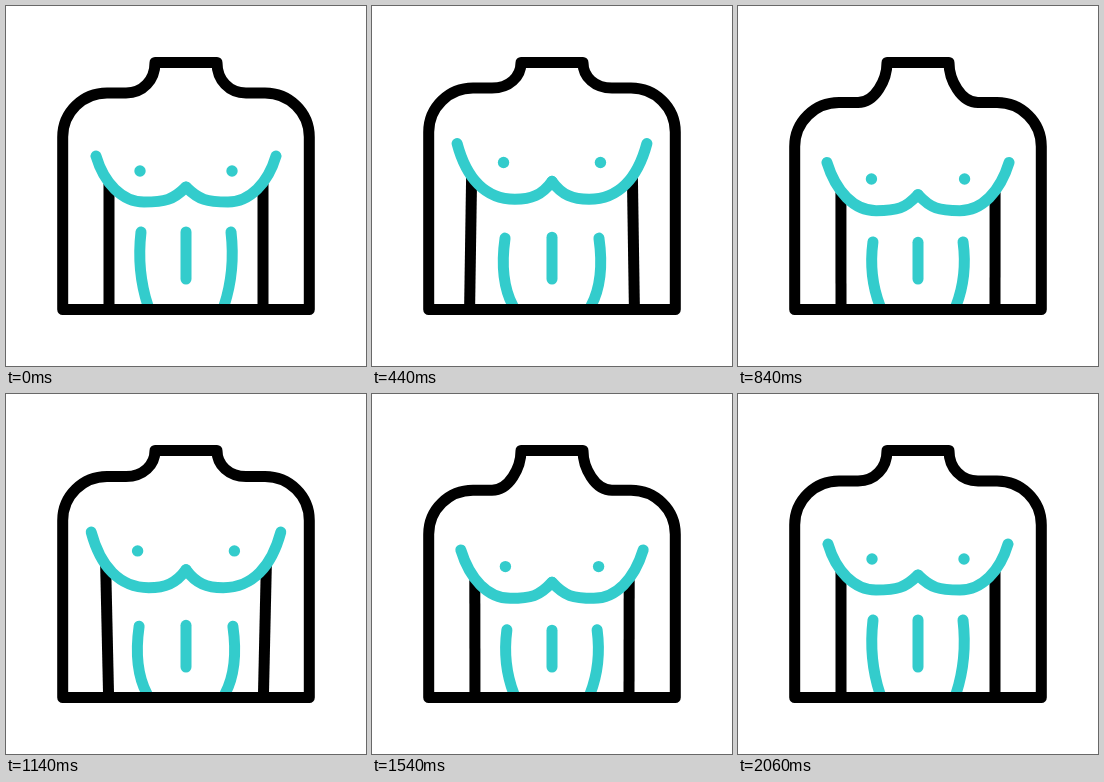
Animation, 360 px wide and 360 px high, one loop 2400 ms. Source, as an HTML page:

```html
<!DOCTYPE html>
<html lang="en">
<head>
<meta charset="utf-8">
<title>Breathing torso</title>
<style>
  html, body { margin: 0; width: 100%; height: 100%; overflow: hidden; background: #fff; }
  svg { display: block; width: 100vw; height: 100vh; }
  path { fill: none; stroke-width: 11; stroke-linejoin: round; }
  .ink { stroke: #000; }
  .teal { stroke: #3cc; stroke-linecap: round; }
  circle { fill: #3cc; }
</style>
</head>
<body>
<svg viewBox="0 0 360 360">
  <g id="half">
    <path id="arm" class="ink"/>
    <path id="chest" class="teal"/>
    <circle id="dot" r="5.7"/>
    <path id="side" class="teal"/>
    <path id="body" class="ink"/>
  </g>
  <use href="#half" transform="translate(360) scale(-1 1)"/>
  <path id="middle" class="teal"/>
</svg>
<script>
const LOOP = 2400;

// All shapes are the left half; the right half is mirrored.
const rest = {
  shoulder: [87, 74],
  arm: [103, 178, 103],
  chest: [90, 150, 98, 177, 116, 196, 138, 196, 159, 196, 167, 194, 180, 181],
  dot: [134, 165],
  side: [135, 226, 130.5, 265, 142, 300],
  middle: [226]
};
const inhale = {
  shoulder: [81.7, 71],
  arm: [99.5, 171, 97.5],
  chest: [85, 137, 94, 171, 113, 193, 143, 193, 159, 193, 170, 189, 180, 175],
  dot: [131.5, 156],
  side: [133, 232, 127, 274, 141, 300],
  middle: [231]
};
const exhale = {
  shoulder: [97, 74],
  arm: [103, 187, 103],
  chest: [89, 157, 98, 186, 116, 205, 138, 205, 159, 205, 167, 203, 180, 189],
  dot: [133.5, 173.5],
  side: [135, 236, 130.5, 270, 142, 300],
  middle: [236.5]
};
const secondInhale = { ...inhale, arm: [99.5, 171, 102.5] };

const steps = [
  [0, rest], [400, inhale], [800, exhale],
  [1200, secondInhale], [1600, exhale], [2060, rest], [LOOP, rest]
];

const el = id => document.getElementById(id);
const draw = (id, d) => el(id).setAttribute('d', d);
const ease = p => (1 - Math.cos(Math.PI * p)) / 2;

function poseAt(t) {
  const i = steps.findIndex(s => s[0] > t);
  const [t0, from] = steps[i - 1];
  const [t1, to] = steps[i];
  const p = ease((t - t0) / (t1 - t0));
  const pose = {};
  for (const key in from) {
    pose[key] = from[key].map((v, n) => v + (to[key][n] - v) * p);
  }
  return pose;
}

function render(t) {
  const pose = poseAt(t);
  const [y, neck] = pose.shoulder;
  const [topX, topY, footX] = pose.arm;
  const [x0, y0, ...curve] = pose.chest;
  const [sx, sy, ...bend] = pose.side;

  draw('body', `M181 56.5H149C149 ${neck} 137 ${y} 120 ${y}H101` +
    `C77 ${y} 56.7 ${y + 19} 56.7 ${y + 44}V303.5H181`);
  draw('arm', `M${topX} ${topY}L${footX} 300`);
  draw('chest', `M${x0} ${y0}C${curve.join(' ')}`);
  draw('side', `M${sx} ${sy}Q${bend.join(' ')}`);
  draw('middle', `M180 ${pose.middle[0]}V273`);
  el('dot').setAttribute('cx', pose.dot[0]);
  el('dot').setAttribute('cy', pose.dot[1]);
}

function tick() {
  render(performance.now() % LOOP);
  requestAnimationFrame(tick);
}
tick();
</script>
</body>
</html>
```
